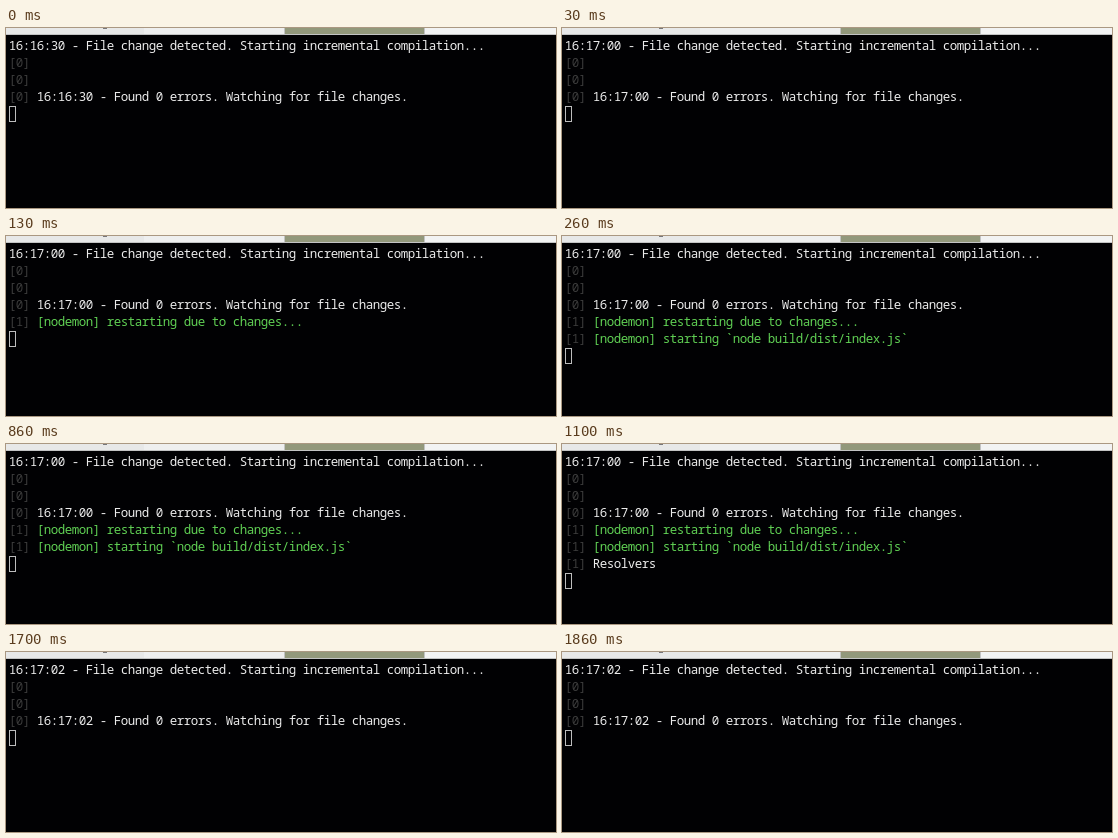
An HTML page with a canvas that plays this animation: 550x180 px, repeating every 3.26 s.

```html
<!DOCTYPE html>
<html lang="en">
<head>
<meta charset="utf-8">
<title>Watch mode terminal</title>
<style>
  html, body { margin: 0; width: 100%; height: 100%; overflow: hidden; background: #010103; }
  canvas { display: block; }
</style>
</head>
<body>
<canvas id="stage" width="550" height="180"></canvas>
<script>
const ctx = document.getElementById('stage').getContext('2d');
const LOOP = 3260;
const LEFT = 3, CELL = 7, FIRST_BASELINE = 22, LINE = 17;
const WHITE = '#ececec', DIM = '#3c3c3c', GREEN = '#60d054', EDGE = '#c2c3c3';

const compileLines = time => [
  [[WHITE, `${time} - File change detected. Starting incremental compilation...`]],
  [[DIM, '[0]']],
  [[DIM, '[0]']],
  [[DIM, '[0] '], [WHITE, `${time} - Found 0 errors. Watching for file changes.`]]
];
const appLine = (text, color = WHITE) => [[DIM, '[1] '], [color, text]];

const restarted = [...compileLines('16:17:00'), appLine('[nodemon] restarting due to changes...', GREEN)];
const started = [...restarted, appLine('[nodemon] starting `node build/dist/index.js`', GREEN)];
const resolvers = [...started, appLine('Resolvers')];
const listing = [
  ...resolvers,
  appLine('{ Query:'),
  appLine('   { books: [Function: books],'),
  appLine('     book: [Function: book],')
];

const timeline = [
  [0, compileLines('16:16:30')],
  [30, compileLines('16:17:00')],
  [100, restarted],
  [200, started],
  [1100, resolvers],
  [1130, listing],
  [1700, compileLines('16:17:02')]
];

function rect(color, x, y, w, h) {
  ctx.fillStyle = color;
  ctx.fillRect(x, y, w, h);
}

function drawTabs() {
  rect(EDGE, 0, 0, 550, 7);
  rect('#e7e8e8', 0, 0, 138, 6);
  rect('#eeefef', 138, 0, 140, 6);
  rect('#92987b', 279, 0, 139, 6);
  rect('#f2f3f3', 419, 0, 131, 6);
  rect('#77777a', 97, 0, 4, 1);
}

// Each glyph sits in the middle of its terminal cell.
function drawLine(parts, row) {
  let column = 0;
  for (const [color, text] of parts) {
    ctx.fillStyle = color;
    for (const glyph of text) {
      ctx.fillText(glyph, LEFT + (column + 0.5) * CELL, FIRST_BASELINE + row * LINE);
      column++;
    }
  }
}

function drawCursor(row) {
  ctx.strokeStyle = '#bdbdbd';
  ctx.lineWidth = 1;
  ctx.strokeRect(3.5, 10.5 + row * LINE, 6, 15);
}

function draw(time) {
  const lines = timeline.filter(([start]) => start <= time).pop()[1];
  rect('#010103', 0, 0, 550, 180);
  drawTabs();
  ctx.font = '12.5px "Noto Sans Mono", "DejaVu Sans Mono", monospace';
  ctx.textAlign = 'center';
  lines.forEach(drawLine);
  drawCursor(lines.length);
}

const origin = performance.now();
function tick() {
  draw((performance.now() - origin) % LOOP);
  requestAnimationFrame(tick);
}
tick();
</script>
</body>
</html>
```
